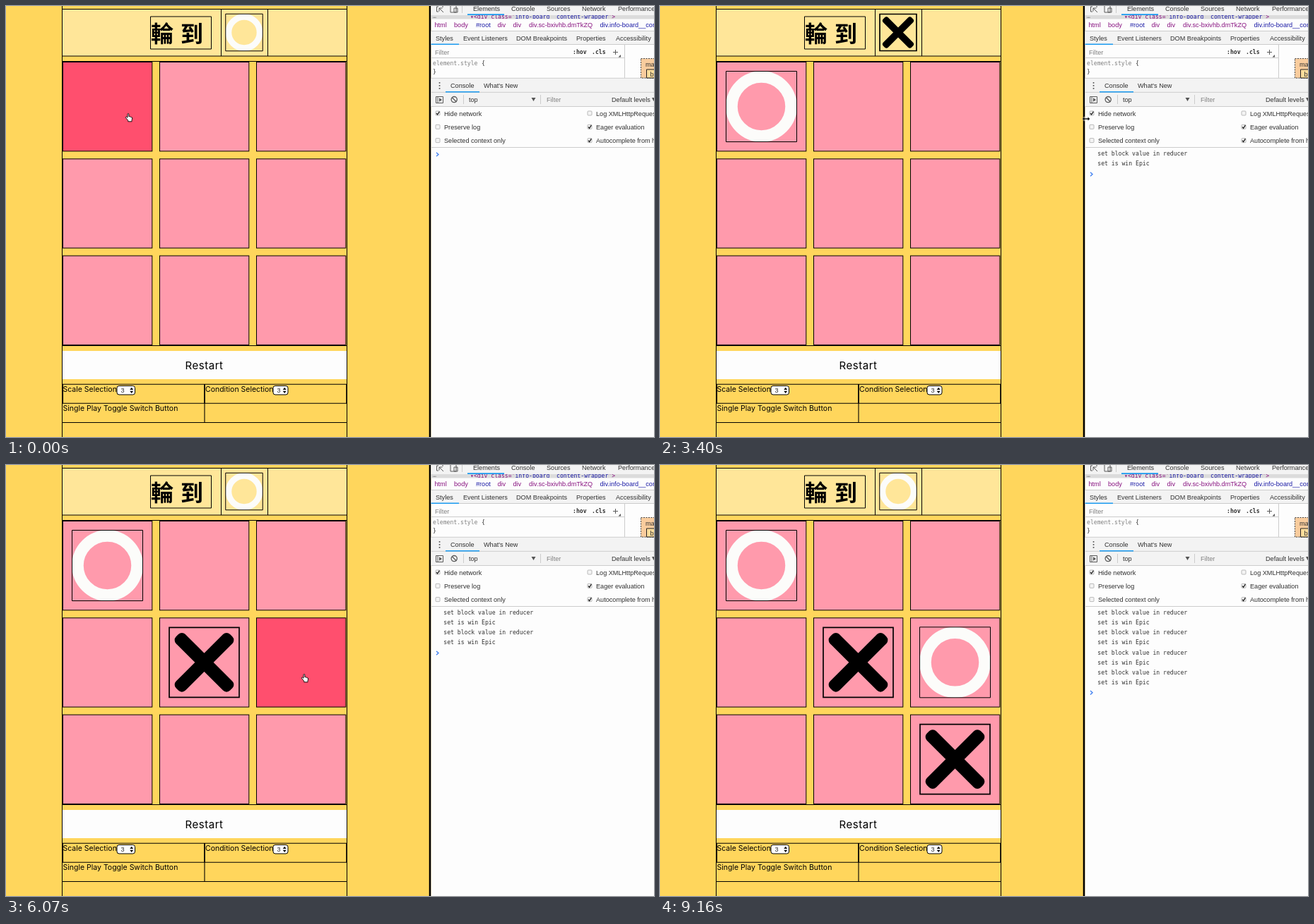
An HTML page for the animation above (9350 ms loop, 917 px wide and 611 px high).

```html
<!DOCTYPE html>
<html lang="en">
<head>
<meta charset="utf-8">
<title>Tic-tac-toe beside the console</title>
<style>
  html, body { margin: 0; width: 100%; height: 100%; overflow: hidden; background: #ffd65c; }
  svg { display: block; width: 917px; height: 611px; }
  text { white-space: pre; font: 9.15px "Liberation Sans", Arial, sans-serif; fill: #303030; }
  .page { font: 10.5px Inter, sans-serif; fill: #000; }
  .restart { font: 15px Inter, sans-serif; letter-spacing: .55px; fill: #000; }
  .turn { font: bold 32px "Noto Sans CJK TC", "Noto Sans CJK", sans-serif; fill: #000; }
  .mono { font: 8.12px "DejaVu Sans Mono", monospace; }
  .bold { font-weight: bold; }
  .dim { fill: #808080; }
  .tag { fill: #881280; }
  .cls { fill: #1a1aa6; }
  .line { fill: none; stroke: #000; }
  .hair { fill: none; stroke: #ccc; }
  .blue { fill: #1a9af0; }
  .icon { fill: none; stroke: #5a5a5a; }
</style>
</head>
<body>
<svg viewBox="0 0 917 611">
  <defs>
    <g id="o">
      <circle r="42" fill="none" stroke="#fcfcfa" stroke-width="16.5"/>
      <rect class="line" x="-50" y="-50" width="100" height="100" vector-effect="non-scaling-stroke"/>
    </g>
    <g id="x">
      <rect x="-54" y="-9.3" width="108" height="18.6" rx="7" transform="rotate(45)"/>
      <rect x="-54" y="-9.3" width="108" height="18.6" rx="7" transform="rotate(-45)"/>
      <rect class="line" x="-49.5" y="-49.5" width="99" height="99" stroke-width="1.7" vector-effect="non-scaling-stroke"/>
    </g>
    <clipPath id="strip"><rect x="602" y="13" width="315" height="5.5"/></clipPath>
  </defs>

  <rect width="917" height="611" fill="#ffd65c"/>
  <path class="line" d="M79.5 0V611M482.5 0V611"/>

  <rect class="line" x="79.5" y="4.5" width="403" height="66.5" style="fill:#ffe699"/>
  <path class="line" d="M304.5 4.5V71M370.5 4.5V71M204.5 15H290.5V61H204.5Z"/>
  <text class="turn" x="205 237 247" y="51">輪 到</text>
  <g id="turn" transform="translate(337 37.5) scale(.525)"></g>

  <rect class="line" x="79.5" y="78.5" width="403" height="403"/>
  <g id="board"></g>

  <rect x="80" y="489" width="402" height="40" fill="#fdfdfd"/>
  <text class="restart" x="280.5" y="515" text-anchor="middle">Restart</text>

  <path class="line" d="M79.5 536.2H482.5M281 536V590M79.5 563.3H482M79.5 590.5H482" stroke-width="1.1"/>
  <path class="line" d="M80.3 536V563M281 536V563M482 536V563" stroke-width="1.5"/>
  <text class="page" x="80.5" y="547.3">Scale Selection</text>
  <text class="page" x="282" y="547.3">Condition Selection</text>
  <text class="page" x="80.5" y="574.3">Single Play Toggle Switch Button</text>
  <g id="select">
    <rect class="line" x="157" y="538.5" width="25.5" height="12.5" rx="3" style="fill:#fdfdfd"/>
    <text x="162.5" y="548.2">3</text>
    <path d="M175.3 544 177.7 540.7 180.1 544ZM175.3 545.8 177.7 549.1 180.1 545.8Z"/>
  </g>
  <g>
    <rect class="line" x="378" y="538.5" width="21" height="12.5" rx="3" style="fill:#fdfdfd"/>
    <text x="383.5" y="548.2">3</text>
    <path d="M391.8 544 394.2 540.7 396.6 544ZM391.8 545.8 394.2 549.1 396.6 545.8Z"/>
  </g>

  <rect x="598.7" width="2.8" height="611"/>
  <rect x="601.5" width="316" height="611" fill="#fdfdfd"/>
  <path fill="#f3f3f3" d="M601.5 0H917V13H601.5ZM601.5 36H917V54.5H601.5ZM601.5 103H917V142H601.5Z"/>
  <rect x="601.5" y="13" width="316" height="5.5" fill="#dcdcdc"/>
  <path class="hair" d="M645.5 0V10M601.5 35.5H917M601.5 54.5H917M601.5 73.5H875M875.5 55V102M601.5 102.3H917M601.5 122.3H917M601.5 142.5H917M601.5 200.5H917M647.5 126V139M756.5 126V139"/>
  <path class="blue" d="M653 11.2H705V13H653ZM601.5 53.5H641V55H601.5ZM622 121H670V122.6H622Z"/>
  <path class="icon" d="M612 1H609.5V8H612M618 0V2M613 3 619 9M613 3V7.5M613 3H617.5M629 0V9H637V0M634 9V3H639V9Z"/>
  <g clip-path="url(#strip)">
    <text class="mono tag" x="657" y="18.3">▾&lt;div class="<tspan class="cls">info-board__content-wrapper</tspan>"&gt;</text>
    <text class="mono dim" x="604" y="17">…</text>
  </g>
  <g id="labels"></g>

  <path d="M859 65.5H866M862.5 62V69" class="icon"/>
  <path d="M870 69V72.5H866.5Z" fill="#555"/>
  <rect x="898.5" y="74.5" width="30" height="27.5" fill="#f9cc9d" stroke="#444" stroke-dasharray="2 1.5"/>
  <path d="M917 90H906.5V102H917" fill="#fddd9b" stroke="#222"/>
  <text x="905" y="85.5">ma</text>
  <text x="911.5" y="99.5">b</text>

  <path fill="#555" d="M612.7 108h1.7v1.7h-1.7zM612.7 112h1.7v1.7h-1.7zM612.7 116h1.7v1.7h-1.7zM743.5 130H749.5L746.5 135ZM914 130H919L916.5 135Z"/>
  <path class="icon" d="M608.5 128.5H618.5V137.5H608.5ZM611 128V138"/>
  <path fill="#555" d="M613 130.3 617 133 613 135.7Z"/>
  <path class="icon" stroke-width="1.3" d="M631 129.5 637.5 136M638.3 132.6A4.1 4.1 0 1 0 630.1 132.6A4.1 4.1 0 1 0 638.3 132.6"/>
  <g id="checks"></g>
  <g id="log"></g>
  <path id="prompt" d="M609 207.7 612 210.4 609 213.1" fill="none" stroke="#3b7df0" stroke-width="1.3"/>

  <g id="cursor" stroke="#000" stroke-width=".9" stroke-linejoin="round" fill="#fff">
    <path id="hand" d="M-1.3 5.8V4.2L-4.6 .4Q-5 -1 -3.4 -.9L-2 .3V-4.8Q-1 -6.4 -.1 -4.8V-1.3Q1 -2 1.6 -.9Q2.9 -1.4 3.2 -.2Q4.7 -.4 4.7 1L4 4.3V5.8Z"/>
    <path id="arrow" d="M-3 -6V4.3L-.7 2.2 .9 5.9 2.5 5.2 .9 1.6H4Z"/>
    <path id="resize" fill="#000" stroke="#fff" stroke-width=".5" d="M-5.5 0-2.3-3V-.9H2.3V-3L5.5 0 2.3 3V.9H-2.3V3Z"/>
  </g>
</svg>
<script>
const LOOP = 9350, TICK = 147.7;
const $ = id => document.getElementById(id);
const add = (parent, tag, attrs, text = "") => {
  const el = document.createElementNS("http://www.w3.org/2000/svg", tag);
  for (const key in attrs) el.setAttribute(key, attrs[key]);
  el.textContent = text;
  return $(parent).appendChild(el);
};
const label = (x, y, text, cls = "", parent = "labels") => add(parent, "text", { x, y, class: cls }, text);
const show = (el, on) => el.setAttribute("visibility", on ? "visible" : "hidden");

// Devtools labels: [baseline, class, x, text, x, text, ...]
[
  [7, "", 661, "Elements", 715, "Console", 765, "Sources", 815, "Network", 866, "Performance"],
  [30, "tag", 606.5, "html", 634, "body", 695.5, "div", 717.5, "div", 740, "div.sc-bxivhb.dmTkZQ"],
  [30, "cls", 665, "#root", 840.5, "div.info-board__content-wrapper"],
  [48.5, "", 608, "Styles", 647, "Event Listeners", 722, "DOM Breakpoints", 807, "Properties", 863, "Accessibility"],
  [68.5, "dim", 607, "Filter"],
  [68.3, "mono bold", 802, ":hov", 829, ".cls"],
  [84.3, "mono dim", 604, "element.style"],
  [84.3, "mono", 673, "{"],
  [96, "mono", 604, "}"],
  [116, "", 629, "Console", 676, "What's New"],
  [136, "", 655, "top", 857, "Default levels"],
  [136, "dim", 765, "Filter"]
].forEach(([y, cls, ...items]) => {
  for (let i = 0; i < items.length; i += 2) label(items[i], y, items[i + 1], cls);
});

[
  ["Hide network", 1, "Log XMLHttpRequests", 0],
  ["Preserve log", 0, "Eager evaluation", 1],
  ["Selected context only", 0, "Autocomplete from history", 1]
].forEach((row, i) => [0, 1].forEach(side => {
  const x = 608 + side * 215, y = 149 + i * 19.3;
  add("checks", "rect", { x, y, width: 6, height: 6, rx: 1, fill: "#f4f4f4", stroke: "#aaa", "stroke-width": .8 });
  if (row[side * 2 + 1]) add("checks", "path", { d: `M${x + 1} ${y + 3}l1.6 2 2.8-4.4`, fill: "none", stroke: "#222", "stroke-width": 1.3 });
  label(x + 12, y + 6.7, row[side * 2], "", "checks");
}));

const logs = Array.from({ length: 8 }, (_, i) =>
  label(619.3, 212 + i * 14.13, i % 2 ? "set is win Epic" : "set block value in reducer", "mono", "log"));

const cells = Array.from({ length: 9 }, (_, i) => {
  const x = 80.5 + i % 3 * 137, y = 79.5 + Math.floor(i / 3) * 137.3;
  return { x, y, el: add("board", "rect", { x, y, width: 126.3, height: 126.3, stroke: "#000" }) };
});

// Moves: tick of the click, cell, mark
const moves = [[5, 0, "o"], [37, 4, "x"], [45, 5, "o"], [53, 8, "x"]].map(([tick, cell, mark]) => {
  const { x, y } = cells[cell];
  return { tick, el: add("board", "use", { href: "#" + mark, transform: `translate(${x + 63} ${y + 63})` }) };
});
const turn = { o: add("turn", "use", { href: "#o" }), x: add("turn", "use", { href: "#x" }) };

// Pointer path: tick, x, y
const path = [
  [0, 174, 158], [6, 175, 158], [7, 187, 160], [9, 268, 171], [10, 285, 173], [12, 287, 174],
  [13, 315, 182], [15, 440, 215], [17, 600, 235], [19, 720, 222], [20, 745, 222],
  [22, 650, 180], [23, 603, 160], [24, 580, 163], [26, 680, 230], [28, 765, 225],
  [29, 735, 235], [30, 620, 268], [31, 480, 275], [32, 382, 264], [34, 305, 284], [35, 297, 289],
  [38, 298, 289], [39, 325, 294], [41, 423, 302], [46, 424, 303], [47, 423, 335], [49, 423, 426],
  [54, 423, 427], [55, 455, 400], [57, 610, 140], [59, 670, 55], [60, 670, 55], [61, 630, 25], [62, 630, 25]
];
const pointer = tick => {
  const i = Math.max(1, path.findIndex(p => p[0] >= tick));
  const [a, b] = [path[i - 1], path[i]], f = (tick - a[0]) / (b[0] - a[0]);
  return [a[1] + (b[1] - a[1]) * f, a[2] + (b[2] - a[2]) * f];
};

function draw(ms) {
  const tick = Math.floor(ms % LOOP / TICK), gone = tick >= 62;
  const [px, py] = pointer(Math.min(tick, 62));
  let over = false;
  cells.forEach(({ x, y, el }) => {
    const hot = !gone && px - 2 > x && px - 2 < x + 126 && py - 5 > y && py - 5 < y + 126;
    over = over || hot;
    el.setAttribute("fill", hot ? "#ff4f6e" : "#ff9aac");
  });

  const played = moves.filter(m => tick >= m.tick).length;
  moves.forEach((m, i) => show(m.el, i < played));
  show(turn.o, played % 2 === 0);
  show(turn.x, played % 2 === 1);
  logs.forEach((line, i) => show(line, i < played * 2));
  $("prompt").setAttribute("transform", `translate(0 ${played * 28.1})`);

  const edge = Math.abs(px - 602) < 4;
  $("cursor").setAttribute("transform", `translate(${px} ${py})`);
  show($("hand"), !gone && over);
  show($("resize"), !gone && !over && edge);
  show($("arrow"), !gone && !over && !edge);
}

const start = performance.now();
const loop = () => {
  draw(performance.now() - start);
  requestAnimationFrame(loop);
};
draw(0);
requestAnimationFrame(loop);
</script>
</body>
</html>
```
